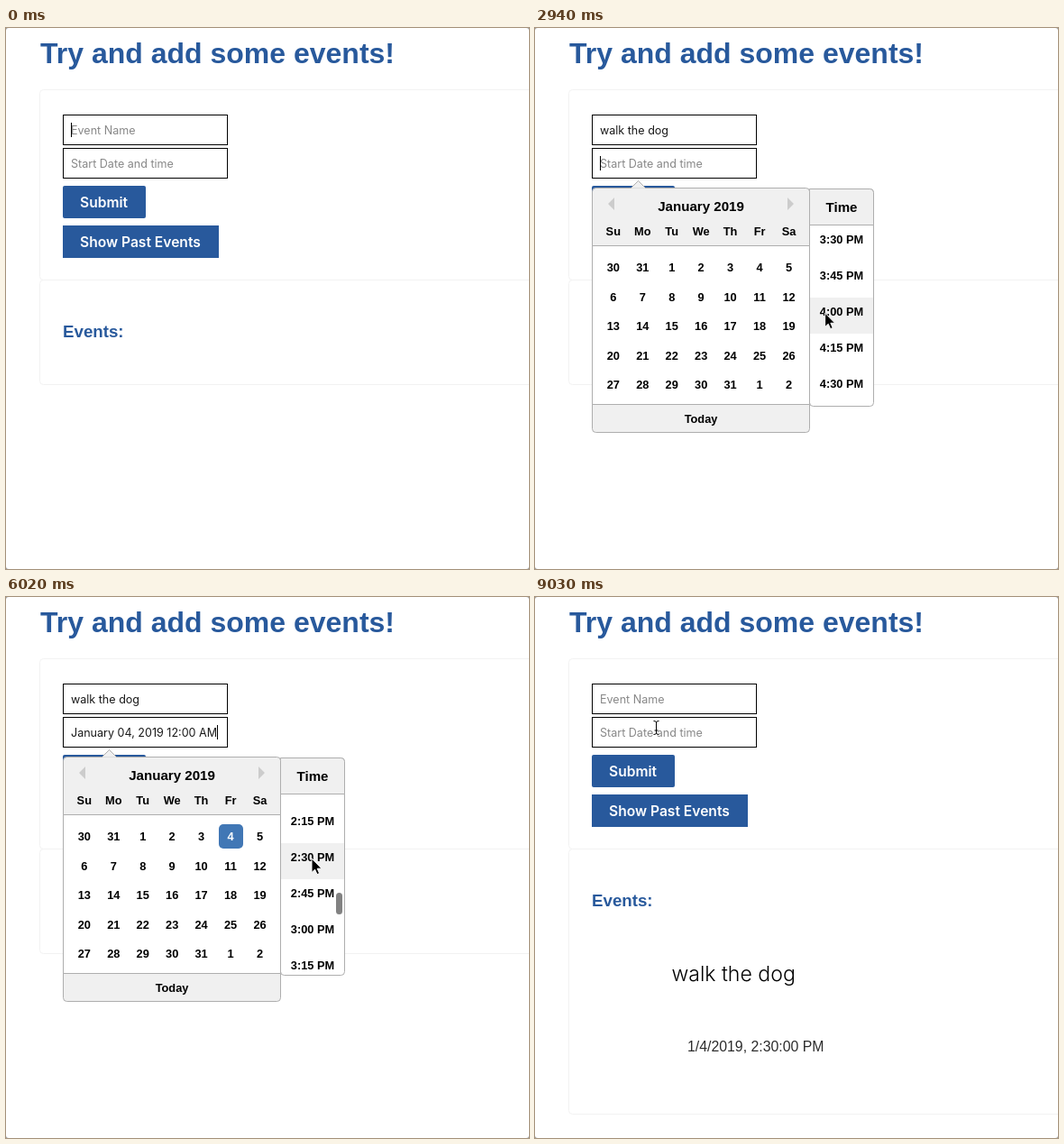
An HTML page that plays this animation: 580x600 px, repeating every 9.1 s.

```html
<!DOCTYPE html>
<html lang="en">
<head>
<meta charset="utf-8">
<title>Event form</title>
<style>
  html, body { margin: 0; width: 100%; height: 100%; overflow: hidden; background: #999; }
  #stage { display: block; width: 580px; height: 600px; background: #fff; border-radius: 3px; }
  text { white-space: pre; }
  .ui { font: 12.55px Inter, sans-serif; fill: #1a1a1a; }
  .ui.hint { fill: #888; }
  .btn { font: 600 15.6px Inter, sans-serif; fill: #fff; }
  .blue { font-family: "Liberation Sans", Arial, sans-serif; font-weight: 700; fill: #28599c; }
  .cal { font: 700 12.8px "Liberation Sans", Arial, sans-serif; text-anchor: middle; fill: #000; }
  .big { font-size: 15.1px; }
  .name { font: 300 23.1px Inter, sans-serif; }
  .when { font: 15.85px "Liberation Sans", Arial, sans-serif; fill: #2c2c2c; }
</style>
</head>
<body>
<svg id="stage" viewBox="0 0 580 600">
  <g fill="none" stroke="#f2f2f2">
    <rect x="37.5" y="68.5" width="600" height="211" rx="4"/>
    <rect id="list" x="37.5" y="279.5" width="600" height="116" rx="4"/>
  </g>
  <text class="blue" x="38" y="39" font-size="32">Try and add some events!</text>
  <g fill="#fff" stroke="#000">
    <rect x="63.5" y="96.5" width="182" height="33"/>
    <rect x="63.5" y="133.5" width="182" height="33"/>
  </g>
  <text id="title" class="ui" x="72" y="118"></text>
  <text id="date" class="ui" x="72" y="155"></text>
  <rect id="caret" width="1" height="16"/>
  <g fill="#28599c">
    <rect x="63" y="175" width="92" height="36" rx="2"/>
    <rect x="63" y="219" width="173" height="36"/>
  </g>
  <text class="btn" x="82" y="199">Submit</text>
  <text class="btn" x="82" y="243">Show Past Events</text>
  <text class="blue" x="63" y="343" font-size="18.72">Events:</text>
  <g id="entry">
    <text class="name" x="151.4" y="426">walk the dog</text>
    <text class="when" x="169" y="504">1/4/2019, 2:30:00 PM</text>
  </g>
  <g id="picker">
    <g stroke="#aeaeae">
      <rect x="304.5" y="178.5" width="71" height="241" rx="4" fill="#fff"/>
      <path d="M304.5 218.5V178.5H371.5Q375.5 178.5 375.5 182.5V218.5Z" fill="#f0f0f0"/>
      <rect x="63.5" y="177.5" width="241" height="271" rx="4" fill="#f0f0f0"/>
      <path d="M63.5 241.5H304.5V417.5H63.5Z" fill="#fff"/>
      <path d="M106.5 177.5L114.5 169.5L122.5 177.5" fill="#f0f0f0"/>
    </g>
    <path d="M107 177.5H122V179H107Z" fill="#f0f0f0"/>
    <path d="M88 188V202L81 195ZM280 188V202L287 195Z" fill="#ccc"/>
    <text class="cal big" x="184" y="203">January 2019</text>
    <text class="cal big" x="340" y="204">Time</text>
    <text class="cal" x="184" y="438">Today</text>
    <rect id="cell" width="27" height="27" rx="5"/>
    <g id="days"></g>
    <svg x="305" y="219" width="70" height="200">
      <g id="times"><rect id="slot" width="70" height="40" fill="#f0f0f0"/></g>
    </svg>
    <rect id="thumb" x="366" width="7" height="24" rx="3.5" fill="#828282"/>
  </g>
  <g id="pointer" stroke-linejoin="round">
    <path id="arrow" d="M0 0V15.5L3.6 12.2L6 17.6L8.6 16.5L6.2 11.2H11Z" stroke="#fff"/>
    <g id="hand" fill="#fff" stroke="#000">
      <path d="M-2 1.5C-2 -.5 1 -.5 1 1.5V6C1.5 5 3.5 5 4 6.8C5 5.8 6.6 6 7 7.6C8 6.8 9.4 7.4 9.4 9V12C9.4 14 8 15 8 18H-1C-1.5 15.5 -4.5 13 -5.5 10.5C-6 9 -4 8 -2.8 9.5L-2 10.5Z"/>
      <path d="M1 6V9M4 7V9.5M7 8V10M1.5 12V15.5M3.7 12V15.5M5.9 12V15.5" fill="none" stroke-width=".8"/>
    </g>
    <g id="beam" fill="none">
      <path d="M-3 -7.5Q0 -7.5 0 -6V6Q0 7.5 -3 7.5M3 -7.5Q0 -7.5 0 -6M0 6Q0 7.5 3 7.5M-2 3H2" stroke="#fff" stroke-width="2.4"/>
      <path d="M-3 -7.5Q0 -7.5 0 -6V6Q0 7.5 -3 7.5M3 -7.5Q0 -7.5 0 -6M0 6Q0 7.5 3 7.5M-2 3H2" stroke="#000"/>
    </g>
  </g>
</svg>
<script>
const LOOP = 9100, TICK = 70;
const OPEN = 2170, PICK_DAY = 3640, PICK_TIME = 6090, SUBMIT = 7490;
const NAME = 'walk the dog';
const KEY_TIMES = [70, 210, 350, 420, 700, 770, 840, 980, 1050, 1400, 1540, 1680];
const COL = 32.45, ROW = 32.5, SLOT = 40, FIRST_SLOT = 62;

// time, x, y of the pointer
const PATH = [
  [2660, 352, 338], [3430, 251, 265], [3990, 251, 265], [4410, 332, 257],
  [5300, 332, 257], [5670, 339, 290], [6370, 339, 290], [7280, 89, 190],
  [8540, 89, 190], [8750, 97, 201], [9030, 134.5, 145]
];

const el = {};
document.querySelectorAll('[id]').forEach(n => el[n.id] = n);

const set = (node, attrs) => { for (const k in attrs) node.setAttribute(k, attrs[k]); };
const show = (node, on) => { node.style.display = on ? '' : 'none'; };

function addText(parent, x, y, str) {
  const n = document.createElementNS('http://www.w3.org/2000/svg', 'text');
  set(n, { class: 'cal', x, y });
  n.textContent = str;
  parent.append(n);
  return n;
}

function timeLabel(i) {
  const h = Math.floor(i / 4), m = String(i % 4 * 15).padStart(2, '0');
  return `${(h + 11) % 12 + 1}:${m} ${h < 12 ? 'AM' : 'PM'}`;
}

const colX = c => 86.8 + c * COL;
['Su', 'Mo', 'Tu', 'We', 'Th', 'Fr', 'Sa'].forEach((d, c) => addText(el.days, colX(c), 230, d));
const dayCells = [];
for (let i = 0; i < 35; i++) {
  const day = (i + 29) % 31 + 1;
  dayCells.push(addText(el.days, colX(i % 7), 270 + Math.floor(i / 7) * ROW, day));
}
for (let i = 56; i < 70; i++) addText(el.times, 35, (i - FIRST_SLOT) * SLOT + 19.5, timeLabel(i));

function pointerAt(t) {
  let i = 0;
  while (i < PATH.length - 2 && t >= PATH[i + 1][0]) i++;
  const [t0, x0, y0] = PATH[i], [t1, x1, y1] = PATH[i + 1];
  const u = Math.min(1, Math.max(0, (t - t0) / (t1 - t0)));
  const e = u * u * (3 - 2 * u);
  return { x: x0 + (x1 - x0) * e, y: y0 + (y1 - y0) * e };
}

function pointerKind(t, x) {
  if (t < 2730) return '';
  if (t < 3990) return x < 300 ? 'hand' : 'arrow';
  if (t < 5400) return 'hand';
  return t < 8890 ? 'arrow' : 'beam';
}

function scrollAt(t) {
  const u = Math.min(1, Math.max(0, (t - 4690) / 980));
  return Math.round(214 * (1 - (1 - u) ** 2.333));
}

function hoveredSlot(t) {
  if (t < 4000) return 64;
  if (t < 4900) return 62;
  return t < 5450 ? 60 : 58;
}

function drawField(node, value, hint) {
  node.textContent = value || hint;
  node.classList.toggle('hint', !value);
}

function drawCaret(t) {
  const first = t < OPEN, node = first ? el.title : el.date;
  const empty = node.classList.contains('hint');
  const x = 72 + (empty ? 0 : Math.round(node.getComputedTextLength()));
  set(el.caret, { x, y: first ? 105 : 142 });
  show(el.caret, t < SUBMIT);
}

function drawPicker(t, p) {
  const open = t >= OPEN && t < PICK_TIME;
  show(el.picker, open);
  if (!open) return;

  const picked = t >= PICK_DAY;
  const col = Math.floor((p.x - 70.6) / COL), row = Math.floor((p.y - 249.5) / ROW);
  const inGrid = col >= 0 && col < 7 && row >= 0 && row < 5;
  const hovering = t >= 2730 && inGrid;
  const c = picked ? 5 : col, r = picked ? 0 : row;
  show(el.cell, picked || hovering);
  set(el.cell, {
    x: Math.round(colX(c) - 13.2), y: 252 + r * ROW,
    fill: !picked ? '#f0f0f0' : inGrid && col === 5 && row === 0 ? '#3d699f' : '#4177b5'
  });
  dayCells[5].style.fill = picked ? '#fff' : '';

  const scroll = scrollAt(t);
  set(el.times, { transform: `translate(0 ${scroll})` });
  set(el.slot, { y: (hoveredSlot(t) - FIRST_SLOT) * SLOT });
  show(el.slot, t >= 2730 && p.x > 305);
  set(el.thumb, { y: 335.4 - scroll * .0345 });
  show(el.thumb, t >= 4760);
}

function render(t) {
  const done = t >= SUBMIT;
  const typed = KEY_TIMES.filter(k => t >= k).length;
  const date = t < PICK_DAY || done ? '' : 'January 04, 2019 ' + (t < PICK_TIME ? '12:00 AM' : '2:30 PM');
  drawField(el.title, done ? '' : NAME.slice(0, typed), 'Event Name');
  drawField(el.date, date, 'Start Date and time');
  drawCaret(t);

  const p = pointerAt(t), kind = pointerKind(t, p.x);
  drawPicker(t, p);
  show(el.entry, done);
  set(el.list, { height: done ? 294 : 116 });

  set(el.pointer, { transform: `translate(${p.x} ${p.y})` });
  for (const k of ['arrow', 'hand', 'beam']) show(el[k], k === kind);
}

const start = performance.now();
function frame() {
  const t = (performance.now() - start) % LOOP;
  render(Math.floor(t / TICK) * TICK);
  requestAnimationFrame(frame);
}
frame();
</script>
</body>
</html>
```
